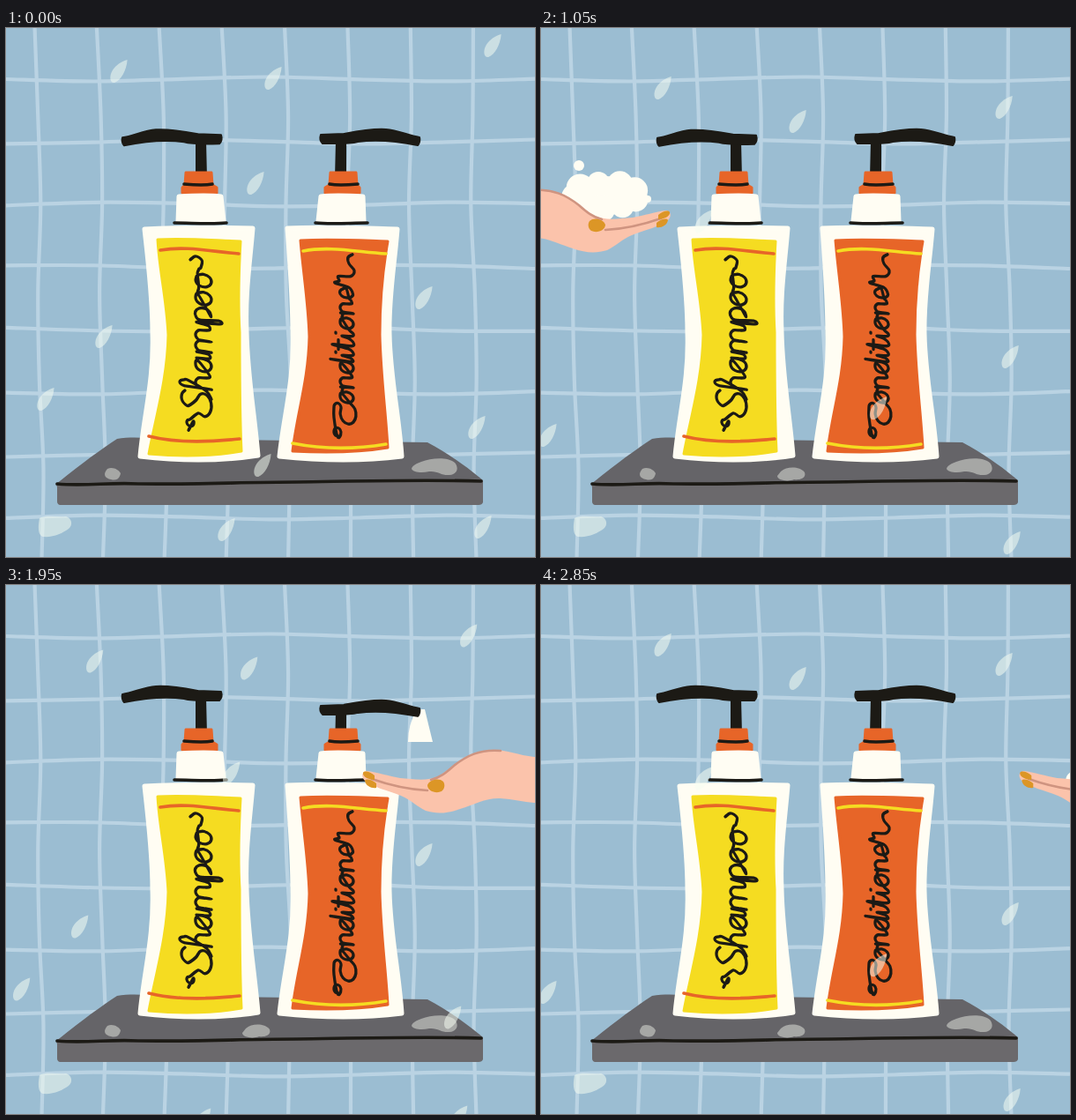
These frames come from a looping animation (600x600 px, 3 s). An HTML page:

```html
<!DOCTYPE html>
<html lang="en">
<head>
<meta charset="utf-8">
<title>Shampoo and Conditioner</title>
<style>
  html, body { margin: 0; width: 100%; height: 100%; overflow: hidden; background: #9bbdd2; }
  svg { display: block; width: 100vw; height: 100vh; }
  .grid path { fill: none; stroke: #bad3e3; stroke-width: 4.2; }
  .ink { fill: none; stroke: #1c1a15; stroke-width: 3.6; stroke-linecap: round; stroke-linejoin: round; }
  .black { fill: #1c1a15; stroke: #1c1a15; stroke-width: 2; stroke-linejoin: round; }
  .white { fill: #fffdf3; stroke: #fffdf3; stroke-width: 5; stroke-linejoin: round; }
  .orange { fill: #e76528; stroke: #e76528; stroke-width: 3; stroke-linejoin: round; }
  .yellow { fill: #f5dc21; stroke: #f5dc21; stroke-width: 3; stroke-linejoin: round; }
  .band { fill: none; stroke-width: 3.6; stroke-linecap: round; }
  .foam { fill: #fffdf3; }
  .crease { fill: none; stroke: #cf9480; stroke-width: 2.6; stroke-linecap: round; }
  .wet { fill: #f6fdf1; fill-opacity: .53; }
  #words { stroke-width: 3.3; }
</style>
</head>
<body>
<svg viewBox="0 0 600 600" preserveAspectRatio="none">
  <defs>
    <path id="drop" d="M12-14C11-1 3 11-6 14C-13 15-14 6-9-1C-4-8 4-12 12-14Z"/>
    <g id="hand">
      <path fill="#fbc3ab" d="M-70 198L0 191C18 189 31 183 46 183C72 185 88 199 108 213C122 219 137 216 152 215C165 213 178 208 190 207C196 208 196 214 192 218C184 225 166 229 151 235C139 240 132 248 123 252C110 256 98 255 84 250C68 245 54 237 38 238C24 239 12 242 0 243L-70 248Z"/>
      <path class="crease" d="M38 184C62 182 77 190 91 201C100 209 106 214 117 217M121 229C142 228 164 223 184 216"/>
      <path fill="#dc9626" d="M103 219C108 214 119 217 121 223C121 230 111 233 105 230C101 227 101 222 103 219ZM181 212C185 208 193 206 194 209C195 214 186 217 181 217ZM179 221C183 217 191 215 192 218C191 224 184 227 179 226Z"/>
    </g>
    <g id="pump" class="black">
      <path d="M375 127L385 127L385 170L374 170Z"/>
      <path d="M357 121L383 120C399 117 414 114 431 115C445 116 456 122 469 124C470 127 469 131 467 133C447 129 422 126 399 129C389 132 372 131 359 131C356 128 356 124 357 121Z"/>
    </g>
    <g id="cap">
      <path class="orange" d="M368 164L397 164L398 178L401 181L401 187L362 187L362 181L367 178Z"/>
      <path class="ink" d="M367 177C377 179 388 178 399 177"/>
      <path class="white" d="M357 191C373 189 389 190 405 191L406 219L354 219Z"/>
    </g>
    <path id="rim" class="ink" d="M351 221C369 223 391 221 410 221"/>
  </defs>

  <rect width="600" height="600" fill="#9bbdd2"/>
  <g class="grid" id="grid"></g>
  <path class="wet" d="M38 556C46 552 57 555 68 554C75 556 76 564 71 568C64 573 54 578 42 577C35 575 37 562 38 556Z"/>

  <path d="M57 517C76 502 104 480 126 466C142 463 160 465 180 466L478 470C501 482 523 498 541 513L540 520L58 521Z" fill="#656468"/>
  <path d="M58 517L541 514L541 538Q540 541 536 541L61 541Q58 540 58 537Z" fill="#6b696c"/>
  <path class="ink" d="M58 517C90 520 118 515 150 517C210 518 270 515 330 515C400 514 470 512 539 514"/>
  <g fill="#a6a7a5">
    <path d="M115 500C121 497 128 501 130 505C129 511 125 514 119 512C113 511 109 507 115 500Z"/>
    <path d="M471 492C482 488 500 486 509 493C514 499 512 506 503 507C494 508 490 502 480 503C471 505 462 504 460 500C461 496 466 494 471 492Z"/>
    <path id="puddle" d="M272 503C279 497 293 497 299 504C301 510 295 513 287 512C280 515 268 513 268 508Z"/>
  </g>

  <g id="soap" class="foam"></g>
  <path id="stream" class="foam" d="M466 0L475 0Q479 34 484 74L456 74Q456 34 466 0Z"/>
  <path id="pile" class="foam" d="M436 224C435 216 440 211 447 211C450 202 460 199 469 202C477 200 487 207 491 224Z"/>

  <!-- shampoo -->
  <g transform="translate(601 0) scale(-1 1)">
    <use href="#pump" id="pumpA"/>
    <use href="#cap"/>
  </g>
  <path class="white" d="M157 228C196 226 238 226 280 227C277 265 271 302 273 345C274 394 282 438 286 485C241 492 194 491 152 486C156 440 168 399 166 345C166 304 161 265 157 228Z"/>
  <use href="#rim" transform="translate(601 0) scale(-1 1)"/>
  <path class="yellow" d="M172 240C203 238 235 241 266 242C264 277 263 311 265 345C265 393 265 438 267 480C232 486 198 486 162 483C170 440 183 398 184 348C182 306 174 276 172 240Z"/>
  <path class="band" stroke="#e76528" d="M175 252C203 247 230 253 264 256M162 463C193 471 228 470 265 466"/>

  <!-- conditioner -->
  <use href="#pump" id="pumpB"/>
  <use href="#cap"/>
  <path class="white" d="M319 227C361 225 403 227 444 228C441 267 434 305 435 347C436 397 446 440 449 486C402 492 356 491 310 486C315 439 327 399 325 347C325 306 322 268 319 227Z"/>
  <use href="#rim"/>
  <path class="orange" d="M334 241C368 239 401 241 433 242C427 276 424 312 424 348C425 394 431 438 433 476C397 482 361 482 325 480C330 437 343 400 344 350C343 313 337 277 334 241Z"/>
  <path class="band" stroke="#f5dc21" d="M337 253C367 247 398 254 431 256M325 471C360 478 396 478 431 472"/>

  <g class="ink" id="words"></g>
  <use href="#hand" id="left"/>
  <use href="#hand" id="right"/>
  <g id="drops" class="wet"></g>
</svg>
<script>
const NS = "http://www.w3.org/2000/svg";
const $ = id => document.getElementById(id);

function add(parent, tag, attrs = {}) {
  const el = document.createElementNS(NS, tag);
  for (const k in attrs) el.setAttribute(k, attrs[k]);
  parent.appendChild(el);
  return el;
}

// Smooth open curve through a flat list of x, y pairs
function curve(p) {
  const n = p.length / 2;
  const at = i => { i = Math.max(0, Math.min(n - 1, i)); return [p[2 * i], p[2 * i + 1]]; };
  let d = `M${p[0]} ${p[1]}`;
  for (let i = 0; i < n - 1; i++) {
    const [a, b, c, e] = [at(i - 1), at(i), at(i + 1), at(i + 2)];
    const q = [0, 1].map(k => b[k] + (c[k] - a[k]) / 6);
    const r = [0, 1].map(k => c[k] - (e[k] - b[k]) / 6);
    d += `C${[...q, ...r, ...c].map(v => +v.toFixed(2)).join(" ")}`;
  }
  return d;
}

// Wavy tile joints
const steps = [0, 1, 2, 3, 4, 5, 6];
for (let i = 0; i < 8; i++) {
  const column = s => [35 + 70.4 * i + s + 2.5 * Math.sin(s * 1.9 - 1.8 + i * .4), s * 100];
  const row = s => [s * 100, 58 + 71 * i + 2.5 * Math.sin(s * 1.6 + i * 1.3)];
  add($("grid"), "path", { d: curve(steps.flatMap(column)) });
  add($("grid"), "path", { d: curve(steps.flatMap(row)) });
}

// Handwriting from pen strokes; angles in degrees, positive turns are clockwise
function arc(cx, cy, rx, ry, from, turn) {
  return [0, 1, 2, 3, 4, 5, 6].flatMap(i => {
    const a = (from + turn * i / 6) * Math.PI / 180;
    return [cx + rx * Math.cos(a), cy + ry * Math.sin(a)];
  });
}
const oval = () => arc(7, -7.5, 6, 7.5, -50, -310);
const hump = x => [x, 0, ...arc(x + 5, -9, 5, 6, 200, 140)];
const foot = x => [x, -2, x + 4, -3];
const glyphs = {
  a: [...oval(), 13, -14, ...foot(14)],
  d: [...oval(), 14, -26, ...foot(14)],
  e: [2, -5, ...arc(7, -8, 5, 7.5, 0, -270), 14, -5],
  h: [2, -5, ...arc(7, -24, 3, 6, 20, -220), ...hump(4), ...foot(15)],
  i: [2, -13, 3, -2, 6, 0, 10, -5],
  m: [1, -14, ...hump(2), ...hump(12), ...foot(23)],
  n: [1, -14, ...hump(2), ...foot(13)],
  o: [...oval(), 12, -13, 17, -12],
  p: [2, -14, 3, 8, 6, 7, ...arc(10, -8, 6, 7.5, 200, 260), 18, -6],
  t: [3, -24, 4, -2, 8, 0, 12, -5]
};

function write(label, x, y, capital, pen, k, tail) {
  const g = add($("words"), "g", {
    transform: `translate(${x} ${y}) rotate(-90) skewX(-8)`, role: "img", "aria-label": label
  });
  add(g, "path", { d: curve(capital) });
  const pts = capital.slice(-2);
  const put = p => p.forEach((v, i) => pts.push(v * k + (i % 2 ? 0 : pen)));
  if (label === "Shampoo") pts.splice(0, 2, pen - 6, 0);
  for (const ch of label.slice(1)) {
    const p = glyphs[ch];
    if (!p) break;
    put(p);
    if (ch === "i") add(g, "path", { d: `M${pen + 4 * k} ${-20 * k}h1` });
    if (ch === "t") add(g, "path", { d: `M${pen - 2 * k} ${-17 * k}h${11 * k}` });
    pen += p[p.length - 2] * k;
  }
  put(tail);
  add(g, "path", { d: curve(pts) });
}

write("Shampoo", 233, 460,
  [...arc(37, -26, 9, 8, -30, -150), ...arc(31, -9, 13, 9, -70, 290), ...arc(9, -24, 4, 4, 0, -300), 0, -26],
  45, 1.2, [2, -10, 9, -9, 12, -15, 8, -20]);
write("Conditioner", 394, 467,
  [...arc(6, -18, 5, 4, 150, 390), 22, -22, ...arc(34, -18, 5, 4, -90, 180), ...arc(29, -6, 12, 9, -100, -240)],
  40, 1, [3, -21, 6, -16, 11, -17, 13, -3, 20, 1, 27, -5, 34, -6, 38, -1]);

// Falling water repeats every four poses: x, y, first pose, last pose
const drops = [
  [128, 49, 0, 2], [303, 57, 0, 3], [552, 20, 0, 2], [283, 176, 0, 2], [111, 350, 0, 2], [45, 421, 0, 1],
  [534, 453, 0, 1], [250, 569, 0, 1], [541, 566, 0, 1], [291, 496, 0, 0], [474, 306, 0, 0], [474, 306, 1, 3],
  [190, -3, 2, 3], [343, 35, 2, 3], [577, 19, 2, 3], [584, 302, 2, 3], [586, 513, 2, 3], [8, 462, 3, 3]
].map(spec => ({ spec, el: add($("drops"), "use", { href: "#drop" }) }));
const fallen = p => 29 * p + 8.4 * p * p;

// A puff of foam: bumps around an oval
function cloud(cx, cy, rx, ry, r) {
  const g = add($("soap"), "g");
  add(g, "ellipse", { cx, cy, rx: rx + r / 2, ry: ry + r / 2 });
  for (let i = 0; i < 9; i++) {
    const a = i * Math.PI / 4.5 + .3;
    add(g, "circle", { cx: cx + rx * Math.cos(a), cy: cy + ry * Math.sin(a), r: r * (1 + .12 * Math.sin(i * 4)) });
  }
  return g;
}
const bubble = (g, cx, cy, r) => add(g, "circle", { cx, cy, r });
const blob = cloud(126, 140, 3, 9, 6);
const puff = cloud(125, 183, 20, 22, 13.5);
const heap = cloud(121, 190, 36, 15, 14);
bubble(puff, 96, 152, 2.5);
bubble(puff, 166, 192, 2.8);
bubble(heap, 91, 156, 6);
bubble(heap, 169, 194, 4);

const show = (el, on) => el.setAttribute("display", on ? "inline" : "none");
const move = (el, x, y, rest = "") => el.setAttribute("transform", `translate(${x} ${y}) ${rest}`);

// Distance of a hand from its resting place under the pump
function away(n, arrive, leave, inPower, inScale, outScale) {
  const d = n < arrive ? inScale * (arrive - n) ** inPower : outScale * Math.max(0, n - leave) ** 2;
  return Math.min(d, 270);
}
// Soft push down and release
function press(n, mid, half, depth) {
  const u = Math.min(1, Math.abs(n - mid) / half);
  return depth * Math.cos(u * Math.PI / 2) ** 2;
}

function pose(n) {
  const lx = -away(n, 5, 5, 2.7, 2.9, 12);
  const rx = away(n, 14, 16, 1.6, 21, 17.7);
  const pushB = press(n, 14.5, 3.5, 26);
  move($("left"), lx, 0);
  move($("right"), 578 + rx, 4, "scale(-1 1)");
  move($("pumpA"), 0, press(n, 3.6, 3.9, 21));
  move($("pumpB"), 0, pushB);

  const size = Math.min(1, (n - 1) / 4);
  show(blob, n === 2 || n === 3);
  show(puff, n >= 3 && n <= 5);
  move(puff, 125 * (1 - size), 217 * (1 - size), `scale(${size})`);
  show(heap, n >= 6 && n <= 8);
  move(heap, lx, 0);

  show($("stream"), n >= 13 && n <= 15);
  move($("stream"), 0, 125 + pushB, `scale(1 ${Math.min(1, (n - 12) / 2)})`);
  show($("pile"), n >= 15);
  move($("pile"), rx, 0);

  const phase = n % 4;
  show($("puddle"), phase > 0);
  for (const { spec: [x, y, first, last], el } of drops) {
    const d = fallen(phase) - fallen(first);
    show(el, phase >= first && phase <= last);
    move(el, x - .73 * d, y + d, "scale(.8 .93)");
  }
}

const epoch = performance.now();
let shown = -1;
function tick() {
  const n = Math.floor((performance.now() - epoch) / 150) % 20;
  if (n !== shown) pose(shown = n);
  requestAnimationFrame(tick);
}
tick();
</script>
</body>
</html>
```
